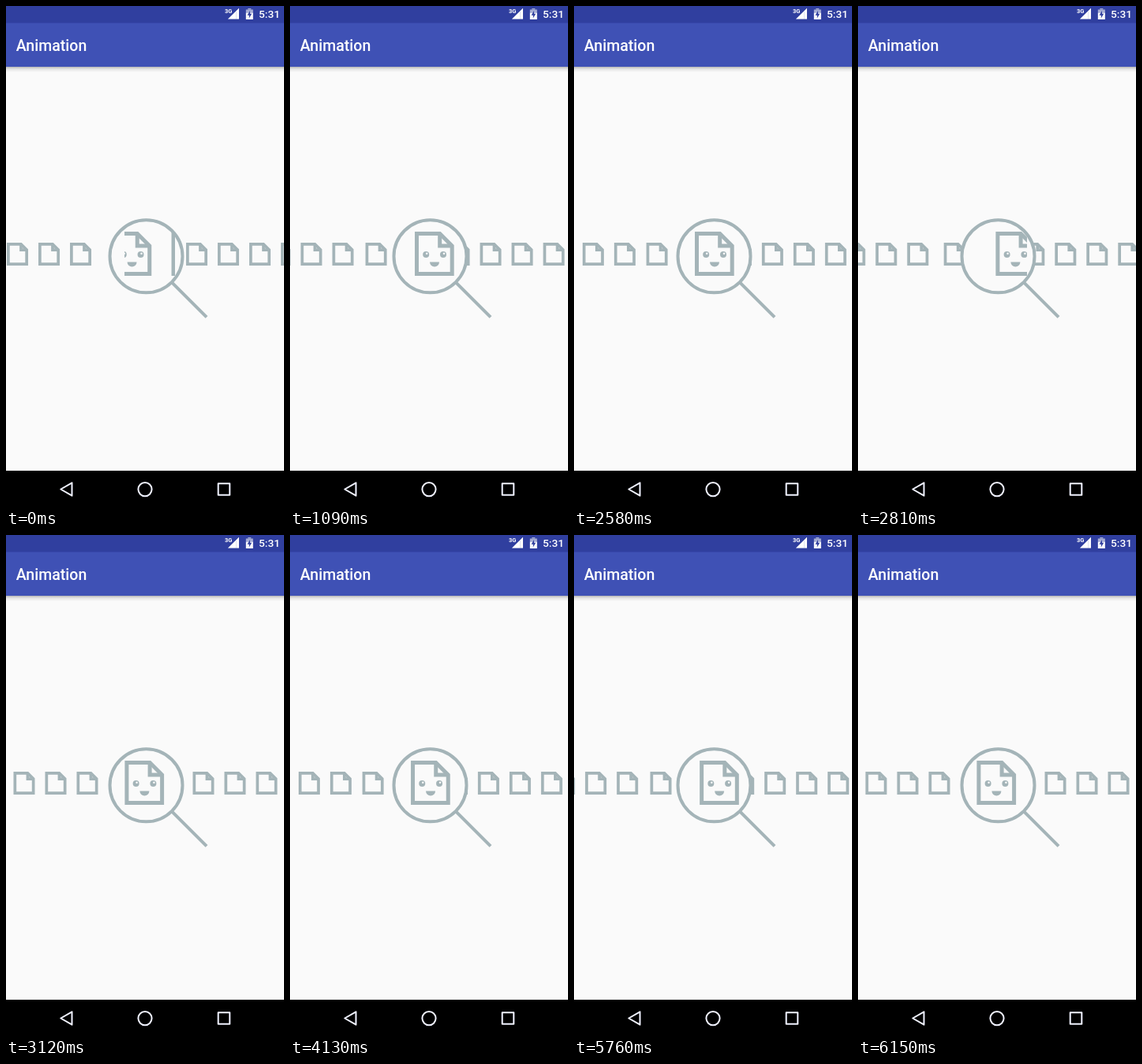
An HTML page with a canvas for the animation above (6.6 s loop, 352 px wide and 635 px high).

```html
<!DOCTYPE html>
<html lang="en">
<head>
<meta charset="utf-8">
<title>Animation</title>
<style>
  html, body { margin: 0; width: 100%; height: 100%; overflow: hidden; background: #fafafa; }
  canvas { display: block; width: 352px; height: 635px; }
</style>
</head>
<body>
<canvas id="stage"></canvas>
<script>
const W = 352, H = 635, LOOP = 6600;
const GREY = '#a4b4b8', PAPER = '#fafafa';
const LENS = { x: 177.5, y: 317.3, r: 46 };
const canvas = document.getElementById('stage');
const ctx = canvas.getContext('2d');
const dpr = window.devicePixelRatio || 1;
canvas.width = W * dpr;
canvas.height = H * dpr;
ctx.scale(dpr, dpr);

// Each run slides the row one place to the right: [start, end] in ms.
const RUNS = [[-410, 110], [1028, 1640], [2561, 3110], [4111, 4650], [5630, 6145]];

// Moments at which the picture is refreshed.
const span = (from, to, n) => Array.from({ length: n }, (_, i) => from + (to - from) * i / (n - 1));
const TICKS = [
  0, 70, 110,
  1090, ...span(1190, 1650, 7),
  2580, ...span(2660, 3120, 7),
  4130, ...span(4200, 4660, 7),
  ...span(5690, 6150, 7)
];

function progress(t) {
  const tick = TICKS.filter(v => v <= t).pop();
  const run = RUNS.find(([a, b]) => tick > a && tick < b);
  return run ? (tick - run[0]) / (run[1] - run[0]) : 0;
}

function rect(x, y, w, h, color) {
  ctx.fillStyle = color;
  ctx.fillRect(x, y, w, h);
}

function trace(points, close) {
  ctx.beginPath();
  points.forEach(([x, y]) => ctx.lineTo(x, y));
  if (close) ctx.closePath();
}

function fillShape(points, color) {
  trace(points, true);
  ctx.fillStyle = color;
  ctx.fill();
}

function disc(x, y, r, color) {
  ctx.beginPath();
  ctx.arc(x, y, r, 0, Math.PI * 2);
  ctx.fillStyle = color;
  ctx.fill();
}

function text(str, x, y, size, weight) {
  ctx.font = `${weight} ${size}px Roboto, sans-serif`;
  ctx.fillStyle = '#fff';
  ctx.fillText(str, x, y);
}

// Sheet outline with a folded top right corner.
function sheet(x, y, w, h, line, fold) {
  const m = line / 2;
  const l = x + m, t = y + m, r = x + w - m, b = y + h - m;
  ctx.strokeStyle = GREY;
  ctx.lineWidth = line;
  trace([[l, t], [r - fold, t], [r, t + fold], [r, b], [l, b]], true);
  ctx.stroke();
  trace([[r - fold, t], [r - fold, t + fold], [r, t + fold]]);
  ctx.stroke();
}

const smallSheet = x => sheet(x, 300, 27, 29, 3.7, 7.2);

function bigSheet(x) {
  sheet(x, 286, 49.7, 56, 5, 15.5);
  for (const eye of [14.2, 36]) {
    disc(x + eye, 315, 4, GREY);
    disc(x + eye + 1, 313.8, 1.3, PAPER);
  }
  ctx.beginPath();
  ctx.arc(x + 25, 324.6, 6, 0, Math.PI);
  ctx.fillStyle = GREY;
  ctx.fill();
}

function drawRow(p) {
  for (const x of [-30.5, 9.5, 49.5, 196.5, 236.5, 276.5, 316.5]) smallSheet(x + 40 * p);
  smallSheet(89.5 + 60 * p);

  disc(LENS.x, LENS.y, LENS.r, PAPER);
  ctx.save();
  ctx.beginPath();
  ctx.rect(150, 280, 64, 70);
  ctx.clip();
  bigSheet(150.4 + 75 * p);
  bigSheet(75.4 + 75 * p);
  ctx.restore();

  ctx.strokeStyle = GREY;
  ctx.lineWidth = 4;
  ctx.beginPath();
  ctx.arc(LENS.x, LENS.y, LENS.r, 0, Math.PI * 2);
  ctx.stroke();
  trace([[210, 350.3], [254, 394.3]]);
  ctx.stroke();
}

function drawBars() {
  const shade = ctx.createLinearGradient(0, 77, 0, 84);
  shade.addColorStop(0, 'rgba(0,0,0,.28)');
  shade.addColorStop(.4, 'rgba(0,0,0,.09)');
  shade.addColorStop(1, 'rgba(0,0,0,0)');
  rect(0, 77, W, 7, shade);
  rect(0, 0, W, 77, '#3f51b5');
  rect(0, 0, W, 21.5, '#303f9f');
  text('Animation', 12.8, 57, 19.55, 500);
  text('5:31', 320, 15.2, 13.7, 500);
  drawStatusIcons();
  drawNav();
}

function drawStatusIcons() {
  text('3G', 277, 9, 7.5, 700);
  fillShape([[281, 16.5], [295, 2.8], [295, 16.5]], 'rgba(255,255,255,.35)');
  fillShape([[281, 16.5], [291.5, 6.2], [291.5, 16.5]], '#fff');
  fillShape([[291.5, 6.2], [295, 2.8], [295, 16.5], [291.5, 16.5]], '#fff');

  rect(306.3, 3, 4, 1.5, '#a6add4');
  rect(303.8, 4.5, 9, 4, '#a6add4');
  rect(303.8, 8.5, 9, 8.5, '#fff');
  fillShape([[309, 6], [305.5, 11.7], [307.8, 11.7], [307.8, 15.5], [311.2, 9.8], [309, 9.8]], '#303f9f');
}

function drawNav() {
  rect(0, 589, W, 46, '#000');
  ctx.strokeStyle = '#f0f2ff';
  ctx.lineWidth = 2;
  ctx.lineJoin = 'round';
  trace([[69.3, 612.5], [83.5, 604.3], [83.5, 620.7]], true);
  ctx.stroke();
  ctx.beginPath();
  ctx.arc(176, 612.6, 8.6, 0, Math.PI * 2);
  ctx.stroke();
  ctx.strokeRect(268.7, 605.2, 14.6, 14.6);
  ctx.lineJoin = 'miter';
}

function frame() {
  rect(0, 0, W, H, PAPER);
  drawRow(progress(performance.now() % LOOP));
  drawBars();
  requestAnimationFrame(frame);
}
frame();
</script>
</body>
</html>
```
